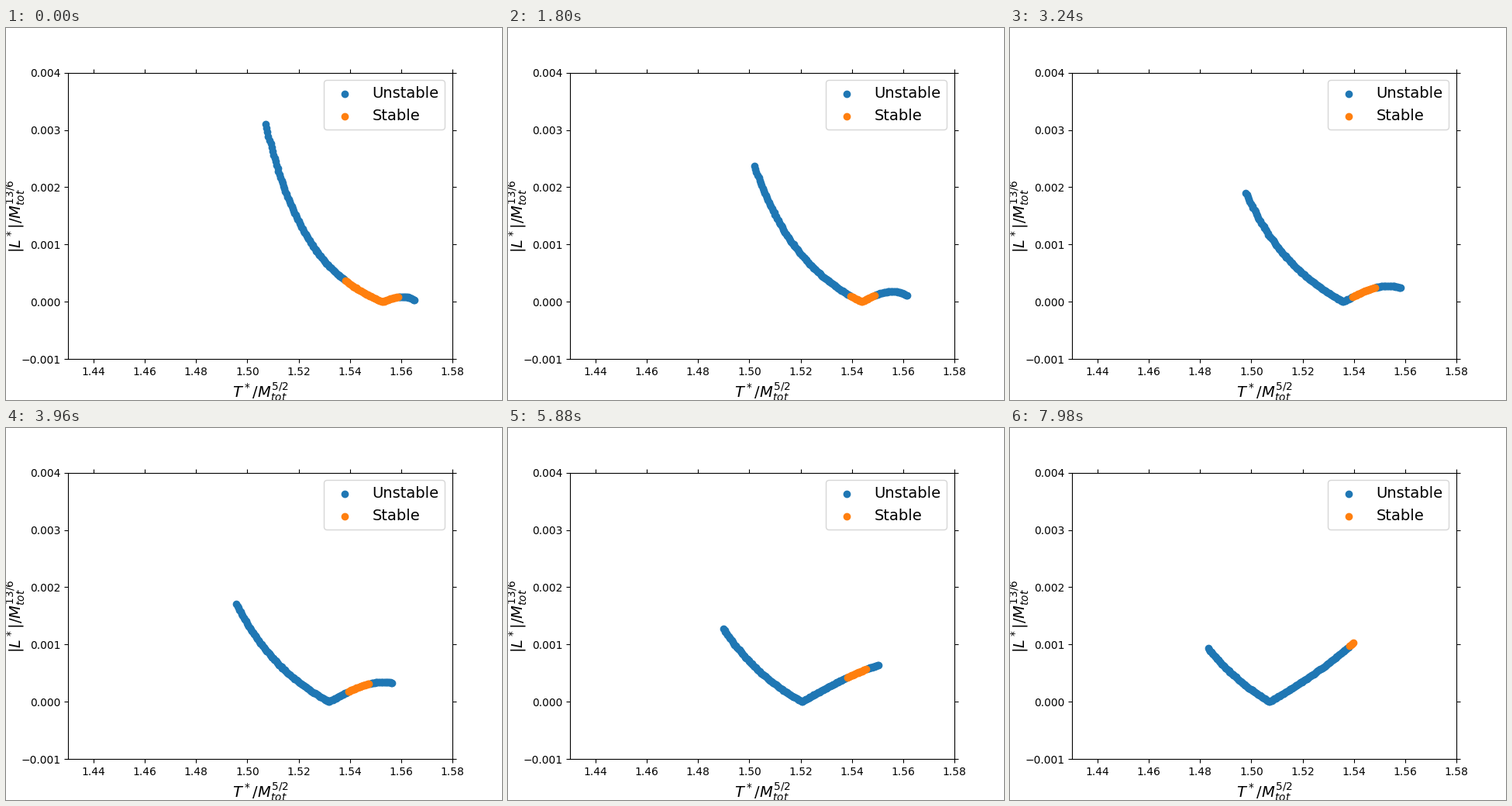
A matplotlib script that plays this animation: 640 px wide and 480 px high, repeating every 8 s.

```python
import numpy as np
import matplotlib.pyplot as plt
from matplotlib.animation import FuncAnimation

LOOP_MS, TICK_MS, STEP_MS = 8000, 20, 60
FRAMES = LOOP_MS // TICK_MS
LAST_STEP = (FRAMES - 1) * TICK_MS // STEP_MS
POINTS = 150
JITTER = 1.5e-4

# Lower edge of the stable range as it drifts over the loop
EDGE_U = [0, 0.143, 0.316, 0.496, 0.624, 0.842, 1]
EDGE_T = [1.53796, 1.53887, 1.53978, 1.53917, 1.53842, 1.53796, 1.53796]


def limits(u):
    """Left end, cusp and right end of the curve."""
    left = 1.50706 - 0.0219 * u - 0.00194 * u**2
    cusp = 1.55278 - 0.03871 * u - 0.00696 * u**2
    right = 1.5653 - 0.01663 * u - 0.00889 * u**4
    return left, cusp, right


def momentum(t, u):
    """Height of the curve at t: a steep left branch, a cubic right one."""
    left, cusp, right = limits(u)
    top = 3.107e-3 * np.exp(-1.2055 * u)
    end = 1e-3 * (0.0243 + 0.149 * u + 0.947 * u**2 - 0.088 * u**8)
    a, b = 1.8 * np.exp(-1.4 * u), np.exp(-7 * u)

    p = np.clip((cusp - t) / (cusp - left), 0, 1)
    r = 1 - p
    falling = top * p / (1 + a * r + b * r**2)

    q = np.clip((t - cusp) / (right - cusp), 0, 1)
    slope = top / (1 + a + b) * (right - cusp) / (cusp - left)
    rising = slope * q + (end - slope) * q**3
    return np.where(t < cusp, falling, rising)


def stable_range(u):
    low = np.interp(u, EDGE_U, EDGE_T)
    high = 1.5484 + 0.0103 * np.exp(-u / 0.08) - 0.0086 * u**4
    return low, high


def curve(step):
    u = step / LAST_STEP
    left, _, right = limits(u)
    t = np.linspace(left, right, POINTS)
    y = momentum(t, u)
    low, high = stable_range(u)
    stable = (t >= low) & (t <= high)
    noise = np.random.default_rng(step).uniform(-JITTER, JITTER, POINTS)
    noise[[0, -1]] = 0
    xy = np.column_stack([np.clip(t + noise, left, right), y])
    return xy[~stable], xy[stable]


fig, ax = plt.subplots(figsize=(6.4, 4.8), dpi=100)
clouds = [ax.scatter([], [], color=color, label=label)
          for color, label in (("C0", "Unstable"), ("C1", "Stable"))]
ax.set_xlim(1.43, 1.58)
ax.set_ylim(-0.001, 0.004)
ax.tick_params(top=True, right=True)
ax.set_xlabel(r"$T^*/M_{tot}^{5/2}$", fontsize=14)
ax.set_ylabel(r"$|L^*|/M_{tot}^{13/6}$", fontsize=14, labelpad=-6)
ax.legend(loc="upper right", fontsize=14)


def update(i):
    for cloud, xy in zip(clouds, curve(i * TICK_MS // STEP_MS)):
        cloud.set_offsets(xy)
    return clouds


anim = FuncAnimation(fig, update, frames=FRAMES, interval=TICK_MS,
                     repeat=True, repeat_delay=0)
plt.show()
```
